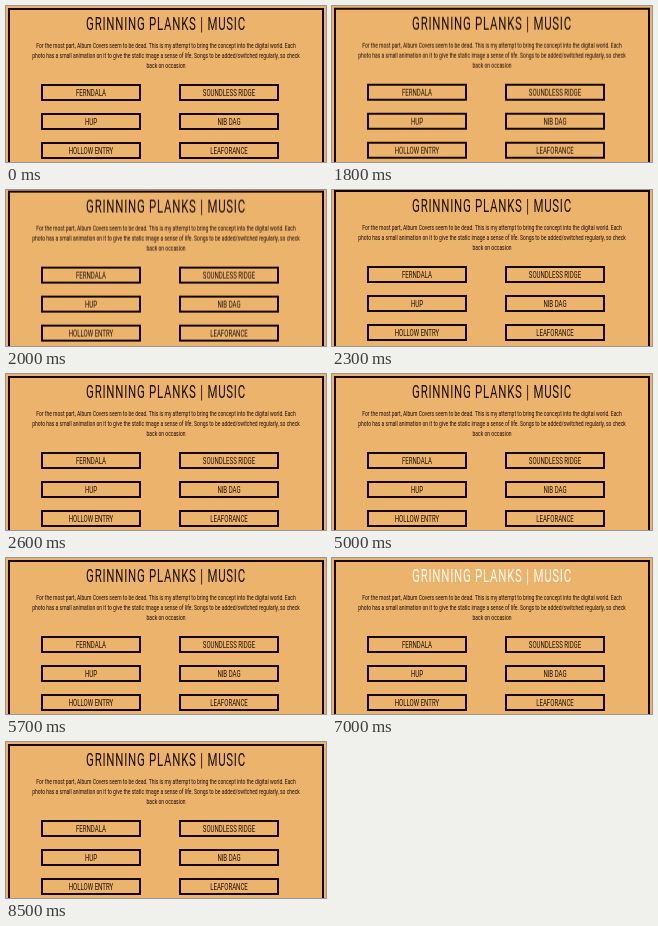
An HTML page that plays this animation: 320 px wide and 156 px high, repeating every 8.6 s.

```html
<!DOCTYPE html>
<html lang="en">
<head>
<meta charset="utf-8">
<style>
  html, body { margin: 0; width: 100%; height: 100%; overflow: hidden; background: #ecb36c; }
  svg { display: block; width: 320px; height: 156px; }
  text { font-family: Roboto, "Liberation Sans", sans-serif; text-anchor: middle; fill: #1c0d08; }
  .frame, .box { fill: none; stroke: #150602; stroke-width: 2; }
  .title { font-size: 18.5px; font-weight: 400; letter-spacing: 1.2px; }
  .intro { font-size: 8.1px; }
  .label { font-size: 9.8px; }

  .page, .title, .hover .box, .hover .label { animation: 8.6s step-end infinite; }
  .page { animation-name: nudge; }
  .title { animation-name: title; }
  .hover .box { animation-name: glow; }
  .hover .label { animation-name: redden; }

  @keyframes nudge {
    0%, 30.23% { transform: none; }
    20.93% { transform: translateY(-.3px); }
    22.09% { transform: translateY(-.8px); }
    23.26% { transform: translateY(-1.4px); }
    24.42% { transform: translateY(-2px); }
    27.91% { transform: translateY(-1.4px); }
    29.07% { transform: translateY(-.7px); }
  }
  @keyframes title {
    0%, 87.21% { fill: #1c0d08; }
    69.76% { fill: #fffaf0; }
  }
  @keyframes glow {
    0%, 46.51% { fill: #ecb36c; }
    40.69% { fill: #fff6a5; }
  }
  @keyframes redden {
    0%, 46.51% { fill: #1c0d08; }
    40.69% { fill: #b3301c; }
  }
</style>
</head>
<body>
<svg viewBox="0 0 320 156">
  <g class="page">
    <path class="frame" d="M3 162V3H317V162"/>
    <g transform="translate(160) scale(.62 1)">
      <text class="title" y="24.5">GRINNING PLANKS | MUSIC</text>
      <text class="intro" y="42">For the most part, Album Covers seem to be dead. This is my attempt to bring the concept into the digital world. Each</text>
      <text class="intro" y="52">photo has a small animation on it to give the static image a sense of life. Songs to be added/switched regularly, so check</text>
      <text class="intro" y="62.3">back on occasion</text>
    </g>
    <g id="songs"></g>
  </g>
</svg>
<script>
  const songs = ["FERNDALA", "SOUNDLESS RIDGE", "HUP", "NIB DAG", "HOLLOW ENTRY", "LEAFORANCE"];
  const hovered = 2;

  const button = (name, i) => {
    const x = 85 + (i % 2) * 138;
    const y = 78 + Math.floor(i / 2) * 29;
    return `<g transform="translate(${x} ${y})" class="${i === hovered ? "hover" : ""}">
      <rect class="box" x="-49" y="1" width="98" height="15"/>
      <text class="label" y="12.2" transform="scale(.62 1)">${name}</text>
    </g>`;
  };

  document.getElementById("songs").innerHTML = songs.map(button).join("");
</script>
</body>
</html>
```
